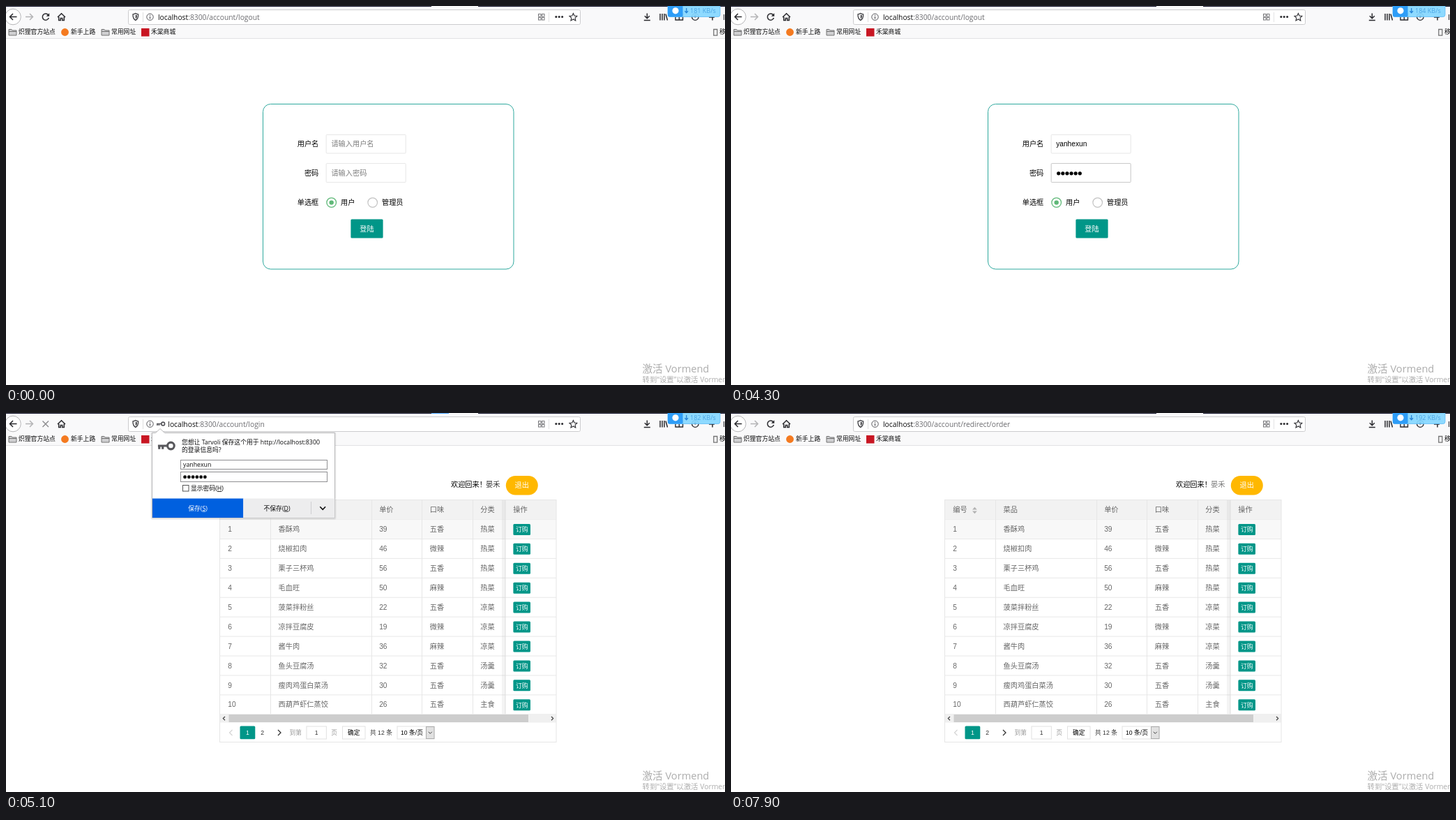
These frames come from a looping animation (1031 px wide and 543 px high, 8 s). An HTML page:

```html
<!DOCTYPE html>
<html lang="zh">
<head>
<meta charset="utf-8">
<title>Login demo</title>
<style>
html, body { margin: 0; width: 100%; height: 100%; overflow: hidden; background: #fff; }
svg { display: block; width: 100%; height: 100%; }
text { white-space: pre; font: 10.2px "Liberation Sans", "Noto Sans CJK SC", "Noto Sans CJK", sans-serif; }
text.ui { font-family: "Open Sans", "Noto Sans CJK SC", "Noto Sans CJK", sans-serif; }
</style>
</head>
<body>
<svg id="stage" viewBox="0 0 1031 543" preserveAspectRatio="none"></svg>
<script>
const LOOP = 8000, STEP = 100;
const USER = 'yanhexun', GREEN = '#009688', INK = '#2a2a2e';

const attrs = o => Object.entries(o).map(([k, v]) => `${k}="${v}"`).join(' ');
const rect = (x, y, w, h, fill, more = {}) =>
  `<rect ${attrs({ x, y, width: w, height: h, fill, ...more })}/>`;
const box = (x, y, w, h, stroke, more = {}) => rect(x, y, w, h, '#fff', { stroke, ...more });
const circle = (cx, cy, r, fill, more = {}) => `<circle ${attrs({ cx, cy, r, fill, ...more })}/>`;
const line = (d, stroke = INK, width = 1.5, more = {}) =>
  `<path ${attrs({ d, stroke, 'stroke-width': width, fill: 'none', ...more })}/>`;
const shape = (d, fill) => `<path d="${d}" fill="${fill}"/>`;
const text = (x, y, s, fill = '#000', size = 10.2, more = {}) =>
  `<text ${attrs({ x, y, fill, style: `font-size:${size}px`, ...more })}>${s}</text>`;
const ui = (x, y, s, fill = '#0c0c0d', size = 8.8, more = {}) =>
  text(x, y, s, fill, size, { class: 'ui', ...more });
const group = (id, body, more = {}) => `<g ${attrs({ id, ...more })}>${body}</g>`;
const accel = c => `(<tspan text-decoration="underline">${c}</tspan>)`;
const dots = (x, y, gap, r) =>
  Array.from({ length: 6 }, (_, i) => circle(x + i * gap, y, r, '#000')).join('');
const mid = { 'text-anchor': 'middle' };

const folder = x =>
  line(`M${x} 33.5h4l1.2 1.5h5.8v7h-11zM${x} 36.5h11`, '#737373', 1, { fill: '#d0d0d2' });
const keyIcon = (x, y, k, color) =>
  `<g transform="translate(${x} ${y}) scale(${k})">` +
  circle(4, 0, 2.6, 'none', { stroke: color, 'stroke-width': 1.7 }) +
  line('M1.5 0H-6M-5 0v2.6M-2.3 0v2.6', color, 1.7) + '</g>';

function chrome() {
  const tiles = [0, 1, 2, 3].map(i =>
    rect(763.5 + (i % 2) * 5, 11.5 + (i >> 1) * 5, 3.5, 3.5, 'none', { stroke: '#77777a' })).join('');
  return rect(0, 0, 1031, 46, '#f9f9fa') + rect(0, 46, 1031, 1, '#e2e2e4') +
    rect(0, 0, 610, 1, '#12122a') + rect(677, 0, 354, 1, '#12122a') +
    rect(610, 0, 25, 1, '#45a1ff', { id: 'tabLoad' }) +
    circle(10, 15.5, 11.3, '#fff', { stroke: '#b5b5b7' }) +
    line('M15.5 15.5H5.5M10 11L5.5 15.5L10 20') +
    line('M28 15.5H38.5M34 11L38.5 15.5L34 20', '#b4b4b6') +
    group('reload', line('M60.6 12.8A4.6 4.6 0 1 0 61.3 17') + shape('M62.2 10.2v4.6h-4.6z', INK)) +
    group('stop', line('M52.5 11.5l8.5 8.5M61 11.5l-8.5 8.5', '#8b8b8e', 1.4)) +
    line('M74 16l5.5-5.2L85 16M75.7 15.5v5h2.6v-3h2.4v3h2.6v-5', INK, 1.5) +
    box(175.5, 5.5, 648, 21, '#ccccce', { rx: 2 }) +
    line('M182 11.8q2.2 0 3.8-1.2q1.6 1.2 3.8 1.2q.3 6.5-3.8 8.6q-4.1-2.1-3.8-8.6z', '#3a3a3e', 1.3) +
    shape('M185.8 12.5q1.2.8 2.2.9q0 3.6-2.2 5z', '#3a3a3e') +
    rect(196, 9, 1, 14, '#dededf') +
    circle(206.5, 15.7, 4.7, 'none', { stroke: '#55555a' }) + line('M206.5 15v3.4M206.5 12.8v1.2', '#55555a', 1.2) +
    group('urlKey', keyIcon(221.5, 15.5, 0.92, '#55555a')) +
    ui(218, 19.5, '<tspan>localhost</tspan><tspan id="path" fill="#6c6c70"></tspan>', '#0c0c0d', 10.3, { id: 'url' }) +
    tiles + rect(778, 9, 1, 14, '#e4e4e5') +
    [788.8, 793.2, 797.6].map(x => circle(x, 15.6, 1.5, INK)).join('') +
    line('M813.4 10.6l1.6 3.5 3.8.4-2.8 2.6.8 3.8-3.4-1.9-3.4 1.9.8-3.8-2.8-2.6 3.8-.4z', INK, 1.1) +
    line('M919.3 10.5v7M915.8 14.3l3.5 3.5 3.5-3.5M914.8 20.5h9') +
    line('M938 11v9.5M941 11v9.5M944 11v9.5M946 11.5l2.5 9') +
    line('M960 11h10.5v9H960zM965.3 11v9', INK, 1.4) +
    circle(988.3, 15.5, 4.8, 'none', { stroke: INK, 'stroke-width': 1.3 }) + circle(988.3, 14.5, 2, INK) +
    line('M1008 16h8M1013 16v4.5', INK) + line('M1029.5 12v8', INK, 1) +
    folder(4) + ui(18, 40.4, '炽狸官方站点') +
    circle(84.5, 37.5, 5.4, '#f47a20') + ui(93, 40.4, '新手上路') +
    folder(137) + ui(151, 40.4, '常用网址') +
    rect(194, 32, 11.5, 11.5, '#c81623') + ui(208, 40.4, '禾棠商城') +
    line('M1014.8 33.5h5v8.6h-5z', '#737373', 1.3) + ui(1023, 40.4, '移');
}

function netWidget() {
  return rect(949, -4, 75, 19.5, '#86d8ff', { rx: 3, 'fill-opacity': .93, stroke: '#5fbcf5', 'stroke-width': .8 }) +
    rect(949, -4, 21.5, 19.5, '#2e9df7', { rx: 2 }) + circle(960, 6.8, 4.6, '#fff') +
    line('M975.7 3v6.5M973.4 7.3l2.3 2.5 2.3-2.5', '#2584d8', 1.3) +
    ui(981, 10, '', '#4ba5e4', 9, { id: 'speed' });
}

function loginPage() {
  const label = (y, s) => text(448.3, y, s, '#000', 10.2, { 'text-anchor': 'end' });
  return rect(368.5, 140.5, 359.5, 236.5, '#fff', { rx: 11, stroke: '#2fa99e' }) +
    label(201, '用户名') + label(243, '密码') + label(284.5, '单选框') +
    box(459.2, 184.4, 114, 26.6, '#e6e6e6', { id: 'nameBox', rx: 1 }) +
    box(459.2, 225.6, 114, 27, '#e6e6e6', { id: 'passBox', rx: 1 }) +
    text(466.4, 201, '请输入用户名', '#7d7d7d', 10.2, { id: 'nameHint' }) +
    text(466.4, 243, '请输入密码', '#7d7d7d', 10.2, { id: 'passHint' }) +
    text(466.2, 201, '', '#000', 10.2, { id: 'name' }) +
    group('pass', dots(469.7, 239.8, 6.12, 2.6)) +
    rect(466, 191, 1, 12, '#000', { id: 'caret' }) +
    circle(466.7, 281.6, 6.8, '#fff', { stroke: '#5fb878', 'stroke-width': 1.3 }) +
    circle(466.7, 281.6, 3.2, '#5fb878') + text(480, 285.2, '用户') +
    circle(525.7, 281.6, 6.8, '#fff', { stroke: '#c2c2c2', 'stroke-width': 1.2 }) + text(539, 285.2, '管理员') +
    rect(494.4, 305.4, 46.2, 27.2, GREEN, { id: 'submit', rx: 1.5 }) +
    text(517.5, 323, '登陆', '#fff', 10.2, mid) +
    group('focus', line('M506.5 306.5h22.5v25.5h-22.5z', '#b9e0dc', 1, { 'stroke-dasharray': '1 .6' }));
}

const MENU = [
  ['香酥鸡', 39, '五香', '热菜'], ['烧椒扣肉', 46, '微辣', '热菜'], ['栗子三杯鸡', 56, '五香', '热菜'],
  ['毛血旺', 50, '麻辣', '热菜'], ['菠菜拌粉丝', 22, '五香', '凉菜'], ['凉拌豆腐皮', 19, '微辣', '凉菜'],
  ['酱牛肉', 36, '麻辣', '凉菜'], ['鱼头豆腐汤', 32, '五香', '汤羹'], ['瘦肉鸡蛋白菜汤', 30, '五香', '汤羹'],
  ['西葫芦虾仁蒸饺', 26, '五香', '主食']
];
const COLS = [318.3, 390.6, 535.2, 607.8, 680.3, 727.3];
const ROW = 27.93;

function menuPage() {
  const cells = (y, row) => row.map((s, i) => text(COLS[i], y, s, '#666')).join('');
  const rows = MENU.map((row, i) => {
    const y = 152.5 + i * ROW;
    return (i ? '' : rect(307, y, 482, ROW, '#f8f8f8')) +
      cells(y + 17.6, [i + 1, ...row]) +
      rect(307, y + ROW - .5, 482, 1, '#e8e8e8') +
      rect(727.4, y + 6.4, 24.6, 16, GREEN, { rx: 1.5 }) +
      text(739.7, y + 17.8, '订购', '#fff', 8.8, mid);
  }).join('');
  const small = (x, s, fill = '#333') => text(x, 461.3, s, fill, 8.7);
  return text(638, 106, '欢迎回来！') + text(688, 106, '晏禾', '#333', 10.2, { id: 'who' }) +
    rect(716.8, 90, 46, 27.4, '#ffb800', { rx: 13.7 }) + text(739.8, 107.3, '退出', '#fff', 10.2, mid) +
    rect(307, 124.5, 482, 28, '#f2f2f2') + rect(307, 152, 482, 1, '#e6e6e6') +
    rows + cells(142.4, ['编号', '菜品', '单价', '口味', '分类', '操作']) +
    shape('M346 138.6l3.4-3.8 3.4 3.8zM346 140.4l3.4 3.8 3.4-3.8z', '#b2b2b2') +
    [379, 524, 596, 669].map(x => rect(x, 124.5, 1, 307, '#e6e6e6')).join('') +
    rect(711, 124.5, 5, 307, '#000', { opacity: .045 }) + rect(715.5, 124.5, 1, 307, '#dedede') +
    rect(307, 431.5, 482, 12, '#f0f0f0') + rect(319.5, 432, 429.5, 11, '#cdcdcd') +
    line('M314 435l-2.6 2.6 2.6 2.6M782 435l2.6 2.6-2.6 2.6', '#444', 1.3) +
    line('M324.5 454l-4 4 4 4', '#d2d2d2', 1.1) + rect(335.5, 448.6, 21.8, 18.6, GREEN, { rx: 1.5 }) +
    text(346.5, 461.3, '1', '#fff', 8.7, mid) + small(365.3, '2') +
    line('M390 454l4 4-4 4', '#333', 1.3) + small(406.5, '到第', '#999') +
    box(431, 449, 28.4, 18, '#e2e2e2') + small(442.7, '1') + small(466.3, '页', '#999') +
    box(482.5, 449, 32.5, 18, '#e2e2e2') + small(490, '确定', '#000') + small(522, '共 12 条') +
    box(561, 449, 53, 18, '#e2e2e2') + small(566, '10 条/页', '#000') +
    rect(602.5, 449.5, 11.5, 17, '#e1e1e1', { stroke: '#adadad' }) +
    line('M605.8 456.8l2.5 2.5 2.5-2.5', '#444', 1) +
    rect(306.5, 124.5, 482.5, 347, 'none', { stroke: '#e6e6e6' });
}

function popup() {
  return rect(207.5, 27, 266, 126, '#000', { opacity: .07, rx: 3 }) +
    line('M209.5 28.5h5l6.5-6 6.5 6h244v121.7h-262z', '#b9b9bb', 1, { fill: '#fff' }) +
    keyIcon(229, 47, 1.85, '#58585c') +
    ui(252, 45, '您想让 Tarvoli 保存这个用于 http://localhost:8300') + ui(252, 56, '的登录信息吗?') +
    box(250.5, 67.5, 210, 13, '#8f8f92') + ui(254, 77, USER) +
    box(250.5, 84.5, 210, 14, '#8f8f92') + dots(256.6, 91.7, 5.75, 2.4) +
    box(253.5, 103.5, 8.5, 8.5, '#555') + ui(265, 111, '显示密码' + accel('H')) +
    rect(210, 122.5, 130.3, 27.5, '#0060df') + ui(275, 139.6, '保存' + accel('S'), '#fff', 8.8, mid) +
    rect(340.3, 122.5, 131, 27.5, '#ededee') +
    rect(340.3, 122.5, 96.5, 27.5, '#dcdcde', { id: 'denyHover' }) +
    ui(388.5, 139.6, '不保存' + accel('D'), '#0c0c0d', 8.8, mid) +
    rect(437, 127, 1, 18, '#cfcfd1') + line('M450.3 134.3l3.9 4 3.9-4', '#0c0c0d', 1.6);
}

document.getElementById('stage').innerHTML =
  rect(0, 0, 1031, 543, '#fff') + group('login', loginPage()) + group('menu', menuPage()) +
  ui(912.5, 525, '激活 Vormend', '#adadad', 14.6) +
  ui(912.5, 538.8, '转到“设置”以激活 Vormend。', '#adadad', 10.4) +
  chrome() + netWidget() + group('popup', popup());

const el = Object.fromEntries([...document.querySelectorAll('[id]')].map(n => [n.id, n]));
const show = (n, on) => n.setAttribute('visibility', on ? 'inherit' : 'hidden');
const set = (n, k, v) => n.setAttribute(k, v);
const put = (n, s) => { if (n.textContent !== s) n.textContent = s; };
const ramp = (t, from, to) => Math.min(1, Math.max(0, (t - from) / (to - from)));
const count = (times, t) => times.filter(at => t >= at).length;
const between = (t, a, b) => t >= a && t < b;
const latest = (list, t) => list.filter(([at]) => t >= at).pop()[1];

const NAME_KEYS = [1700, 1900, 2000, 2000, 2200, 2300, 2400, 2500];
const PASS_KEYS = [3100, 3400, 3600, 3800, 4000, 4300];
const SPEEDS = [[0, 181], [800, 183], [1900, 182], [3200, 183], [4100, 184], [5000, 182], [7100, 192]];
const PATHS = [[0, 'logout'], [5100, 'login'], [7900, 'redirect/order']];
const edge = f => { const v = Math.round(230 - 32 * f); return `rgb(${v},${v},${v})`; };

function draw(t) {
  const typed = count(NAME_KEYS, t), hidden = count(PASS_KEYS, t);
  const onMenu = t >= 5100;
  show(el.login, !onMenu);
  show(el.menu, onMenu);

  put(el.name, USER.slice(0, typed));
  show(el.nameHint, !typed);
  show(el.passHint, !hidden);
  [...el.pass.children].forEach((dot, i) => show(dot, i < hidden));
  set(el.nameBox, 'stroke', edge(ramp(t, 600, 900) - ramp(t, 2700, 2900)));
  set(el.passBox, 'stroke', edge(ramp(t, 2700, 2900) - ramp(t, 4700, 4900)));

  const inName = t < 2700;
  show(el.caret, between(t, 700, 1200) || between(t, 1700, 2700) || between(t, 2800, 4100));
  set(el.caret, 'x', inName ? 466 + (typed && el.name.getComputedTextLength()) : 466.4 + hidden * 6.12);
  set(el.caret, 'y', inName ? 191 : 233);
  if (onMenu) show(el.caret, false);

  set(el.submit, 'fill', t >= 4500 ? '#2aa79b' : GREEN);
  show(el.focus, !onMenu && t >= 4800);

  const asking = between(t, 4800, 7000), loading = between(t, 5100, 5500);
  show(el.urlKey, asking);
  set(el.url, 'x', asking ? 232.3 : 218);
  put(el.path, ':8300/account/' + latest(PATHS, t));
  show(el.reload, !loading);
  show(el.stop, loading);
  show(el.tabLoad, loading);
  put(el.speed, latest(SPEEDS, t) + ' KB/s');

  const open = ramp(t, 4880, 5080);
  show(el.popup, asking && open > 0);
  set(el.popup, 'opacity', open);
  set(el.popup, 'transform', `translate(0 ${-5.2 * (1 - open)})`);
  show(el.denyHover, asking && t >= 5700);
  set(el.denyHover, 'opacity', ramp(t, 5600, 5900));
  set(el.who, 'fill', t >= 7400 ? '#777' : '#333');
}

function tick(now) {
  draw(Math.floor((now % LOOP) / STEP) * STEP);
  requestAnimationFrame(tick);
}
draw(0);
requestAnimationFrame(tick);
</script>
</body>
</html>
```
